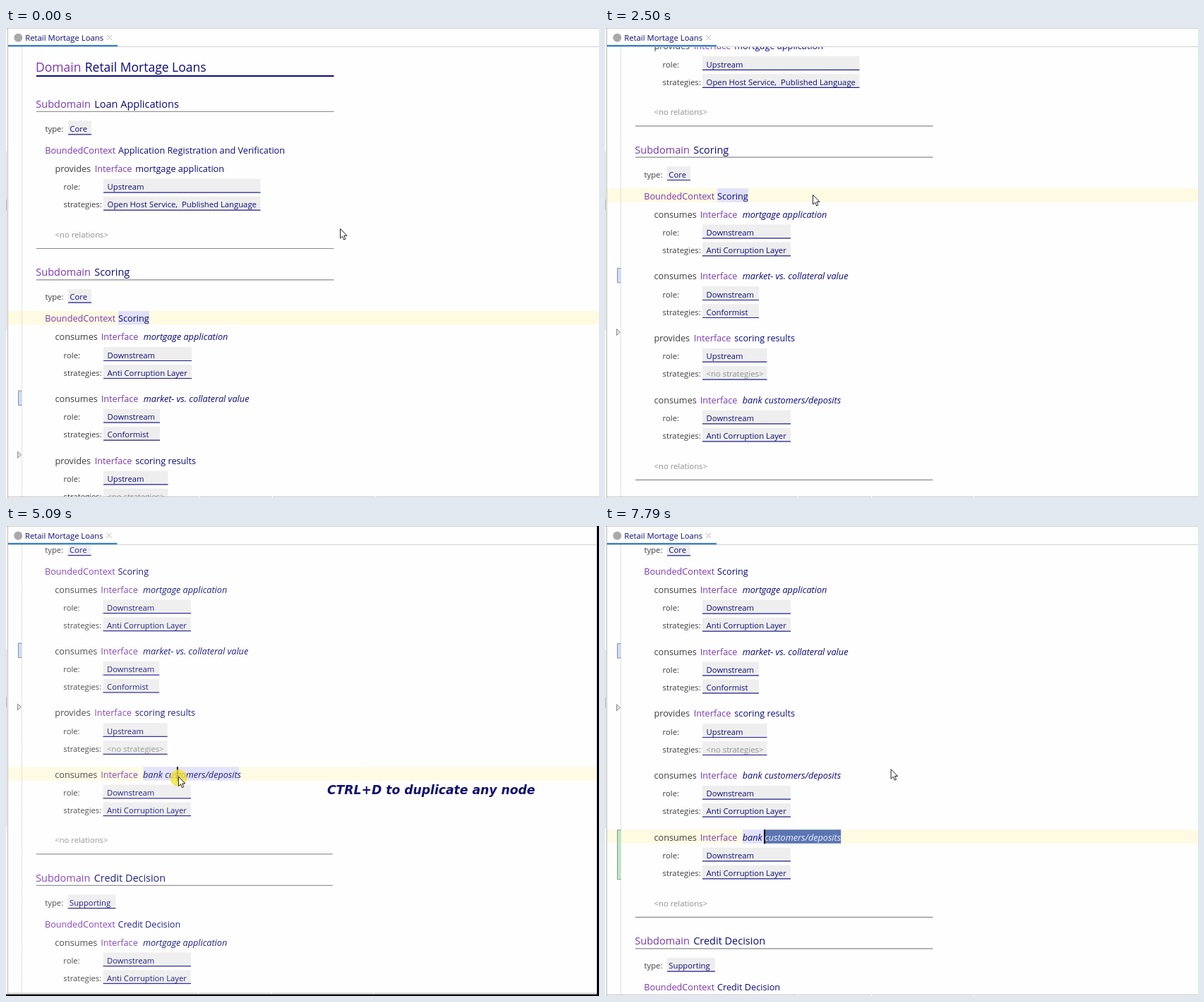
Recreate the animation shown at these times as an HTML page. Size 840 by 666 pixels, loop 8 s.

```html
<!DOCTYPE html>
<html lang="en">
<head>
<meta charset="utf-8">
<title>Domain editor</title>
<style>
html, body { margin: 0; width: 100%; height: 100%; overflow: hidden; background: #000; }
svg { display: block; width: 840px; height: 666px; }
text { font-family: "Open Sans", "Noto Sans", sans-serif; white-space: pre; }
.h1 { font-size: 17.5px; }
.h2 { font-size: 14.5px; }
.b { font-size: 12.7px; }
.s { font-size: 11.3px; }
.navy { fill: #0b0b78; }
.key { fill: #7a35b0; }
.dark { fill: #3c3c3c; }
.mute { fill: #8e8e8e; }
.it { font-style: italic; }
.tip { font: italic bold 17.2px "DejaVu Sans", Verdana, sans-serif; fill: #10106e; }
</style>
</head>
<body>
<svg viewBox="0 0 840 666">
  <defs><clipPath id="view"><rect x="0" y="27" width="840" height="637"/></clipPath></defs>
  <g id="page">
    <rect width="840" height="666" fill="#fefefe"/>
    <g clip-path="url(#view)">
      <g id="doc">
        <rect id="row" x="3" width="837" height="19.5" fill="#fffae2"/>
        <rect id="cell" height="19.5" fill="#e1e1fb"/>
        <rect id="range" height="19.5" fill="#5b75b0"/>
      </g>
      <path d="M22.5 27V664" stroke="#c4c4c4" stroke-dasharray="1 1"/>
      <g id="marks"></g>
    </g>
    <path d="M0 .5H840M158 26.5H840" stroke="#d0d0d0"/>
    <path d="M2.5 0V666" stroke="#b8b8b8"/>
    <path d="M.5 175V428" stroke="#cfcfcf"/>
    <path d="M.5 243V258" stroke="#a0a0a0"/>
    <path d="M3 664.5H273M274 664.5H377M378 664.5H522M523 664.5H840" stroke="#bdbdbd"/>
    <rect x="3" y="24" width="155" height="2.5" fill="#3c80c6"/>
    <circle cx="17.3" cy="13.8" r="6" fill="#a9a9a9"/>
    <text class="s navy" x="27.2" y="18">Retail Mortage Loans</text>
    <path d="M143 10l7 7M150 10l-7 7" stroke="#b4b4b4"/>
    <rect id="caret" width="2" height="20"/>
    <circle id="click" cx="245.3" cy="358.2" r="12" fill="#f2e23a" opacity=".8"/>
    <path id="mouse" d="M.5 .5V14L3.6 11.1L5.7 16L7.9 15L5.8 10.3H10Z" fill="#fff" stroke="#222"/>
  </g>
  <text id="tip" class="tip" x="455" y="380">CTRL+D to duplicate any node</text>
</svg>
<script>
const $ = id => document.getElementById(id);
const doc = $('doc');
const STEP = 87.7;   // height of one interface block
const NOTCH = 57.9;  // one wheel click
const LOOP = 8000;

function add(parent, tag, attrs, str) {
  const el = document.createElementNS('http://www.w3.org/2000/svg', tag);
  for (const k in attrs) el.setAttribute(k, attrs[k]);
  if (str) el.textContent = str;
  return parent.appendChild(el);
}
const text = (g, x, y, cls, str) => add(g, 'text', { x, y, class: cls }, str);
const rule = (g, y, color = '#8a8a8a', w = 1.2) =>
  add(g, 'path', { d: `M43 ${y}H464.5`, stroke: color, 'stroke-width': w });

function field(g, x, y, right, str, cls = 'navy') {
  add(g, 'rect', { x, y: y - 15.5, width: right - x, height: 19, fill: '#eeeeee' });
  add(g, 'path', { d: `M${x} ${y + 3.8}H${right}`, stroke: '#1c1c8c', 'stroke-width': 1.2 });
  text(g, x === 88 ? 90.3 : 143.6, y, 's ' + cls, str);
}

function iface(g, y, uses, name, right, strategy) {
  text(g, 69.5, y, 'b dark', uses ? 'consumes' : 'provides');
  text(g, uses ? 134.8 : 125.8, y, 'b key', 'Interface');
  const label = text(g, uses ? 194.7 : 183.3, y, 'b navy' + (uses ? ' it' : ''), name);
  text(g, 81.6, y + 25.3, 's dark', 'role:');
  field(g, 138, y + 25.3, right, uses ? 'Downstream' : 'Upstream');
  text(g, 81.6, y + 50.3, 's dark', 'strategies:');
  field(g, 138, y + 50.3, right, strategy, strategy[0] === '<' ? 'mute' : 'navy');
  return label;
}

function head(g, y, name, type, right, context) {
  text(g, 42.3, y, 'h2 key', 'Subdomain');
  text(g, 125.2, y, 'h2 navy', name);
  rule(g, y + 5.5);
  text(g, 55.5, y + 34, 's dark', 'type:');
  field(g, 88, y + 34, right, type);
  text(g, 55.2, y + 65, 'b key', 'BoundedContext');
  text(g, 159, y + 65, 'b navy', context);
}

function foot(g, y) {
  text(g, 69.5, y + 93, 's mute', '<no relations>');
  rule(g, y + 108.5);
}

text(doc, 42, 62, 'h1 key', 'Domain');
text(doc, 111.8, 62, 'h1 navy', 'Retail Mortage Loans');
rule(doc, 68, '#0b0b78', 2);

head(doc, 113, 'Loan Applications', 'Core', 121, 'Application Registration and Verification');
iface(doc, 204, false, 'mortgage application', 360.5, 'Open Host Service,  Published Language');
foot(doc, 204);

const SCORE = 351.4, FIRST = SCORE + 91, BANK = FIRST + 3 * STEP;
const BANK_NAME = 'bank customers/deposits';
head(doc, SCORE, 'Scoring', 'Core', 121, 'Scoring');
iface(doc, FIRST, true, 'mortgage application', 263, 'Anti Corruption Layer');
iface(doc, FIRST + STEP, true, 'market- vs. collateral value', 218, 'Conformist');
iface(doc, FIRST + 2 * STEP, false, 'scoring results', 229.5, '<no strategies>');
iface(doc, BANK, true, BANK_NAME, 263, 'Anti Corruption Layer');

const copy = add(doc, 'g', {});
const label = iface(copy, BANK + STEP, true, BANK_NAME, 263, 'Anti Corruption Layer');
const tail = add(doc, 'g', {});
foot(tail, BANK);
const CREDIT = BANK + 147.6;
head(tail, CREDIT, 'Credit Decision', 'Supporting', 156, 'Credit Decision');
iface(tail, CREDIT + 91, true, 'mortgage application', 263, 'Anti Corruption Layer');

// gutter marks
const bracket = (g, y, h, fill) => add(g, 'path',
  { d: `M22.5 ${y}H17.5V${y + h}H22.5`, fill, stroke: '#8793a6' });
const marks = $('marks');
bracket(marks, FIRST + STEP - 16, 20.5, '#cfdcf7');
add(marks, 'path', { d: `M16.5 ${FIRST + 2 * STEP - 17.5}v9l5 -4.5z`, fill: '#e4e4e4', stroke: '#8c8c8c' });
const added = bracket(marks, BANK + STEP - 15, 70, '#bfe6c0');

// selected part of the copied name
const charX = i => i < BANK_NAME.length
  ? label.getStartPositionOfChar(i).x
  : label.getEndPositionOfChar(i - 1).x;
const END = BANK_NAME.length;
label.textContent = '';
const plain = add(label, 'tspan', {}, BANK_NAME);
const picked = add(label, 'tspan', { fill: '#f0f0ff' });

const path = [
  [0, 473, 284], [60, 473, 284], [160, 536, 248], [405, 536, 248], [720, 506, 231],
  [930, 506, 231], [1350, 400, 217], [1730, 300, 229], [1790, 300, 229], [2270, 294, 236],
  [2650, 294, 236], [2800, 291, 237.5], [3910, 291, 237.5], [4690, 244.8, 356],
  [5470, 244.8, 356], [5700, 408, 346], [5780, 404.6, 344.2], [LOOP, 404.6, 344.2]
];
function mouseAt(t) {
  const i = path.findIndex(p => p[0] > t);
  const a = path[i - 1], b = path[i], k = (t - a[0]) / (b[0] - a[0]);
  return [a[1] + (b[1] - a[1]) * k, a[2] + (b[2] - a[2]) * k];
}

const wheel = [1790, 1950, 2130, 2650, 2800, 3910];
const lit = [[90, 500], [1000, 1500], [2000, 2500], [3030, 3500], [4000, 5500], [6040, 6340], [6560, LOOP]];
const ramp = (t, a, b) => Math.min(1, Math.max(0, (t - a) / (b - a)));
const show = (el, on) => el.setAttribute('visibility', on ? 'visible' : 'hidden');
function place(el, attrs) { for (const k in attrs) el.setAttribute(k, attrs[k]); }

// [baseline, cell left, cell right, caret x]
function focus(t, from) {
  if (t < 4690) return [SCORE + 65, 159, 203, 172];
  if (t < 6560) return [BANK, 195, 331.5, 242.8];
  if (t < 7250) return [BANK + 51, 82, 135, 82];
  return [BANK + STEP, 195, charX(END), charX(from) - 1];
}

let lastFrom = -1;
function draw(t) {
  const scroll = NOTCH * wheel.filter(w => t >= w).length;
  const doubled = t >= 6480;
  const from = t < 7700 ? END : t < 7790 ? 15 : 5;
  if (from !== lastFrom) {
    plain.textContent = BANK_NAME.slice(0, from);
    picked.textContent = BANK_NAME.slice(from);
    lastFrom = from;
  }

  place(doc, { transform: `translate(0 ${-scroll})` });
  place(marks, { transform: `translate(0 ${-scroll})` });
  place(tail, { transform: `translate(0 ${doubled ? STEP : 0})` });
  show(copy, doubled);
  show(added, doubled);

  const [base, left, right, caretX] = focus(t, from);
  const top = base - 15.5;
  place($('row'), { y: top });
  place($('cell'), { x: left, y: top, width: right - left });
  show($('range'), from < END);
  if (from < END) place($('range'), { x: charX(from), y: top, width: right - charX(from) });
  place($('caret'), { x: caretX, y: top - scroll });
  show($('caret'), lit.some(([a, b]) => t >= a && t < b));

  const zoom = t < 7170 ? ramp(t, 4740, 5090) : 1 - ramp(t, 7175, 7250);
  place($('page'), { transform: `scale(${1 - 0.0036 * zoom})` });
  place(doc, { opacity: 1 - 0.1 * zoom });
  place($('tip'), { opacity: zoom });
  show($('click'), t >= 4690 && t < 5250);
  const [mx, my] = mouseAt(t);
  place($('mouse'), { transform: `translate(${mx} ${my})` });
}

const start = performance.now();
function tick() {
  draw((performance.now() - start) % LOOP);
  requestAnimationFrame(tick);
}
draw(0);
requestAnimationFrame(tick);
</script>
</body>
</html>
```
